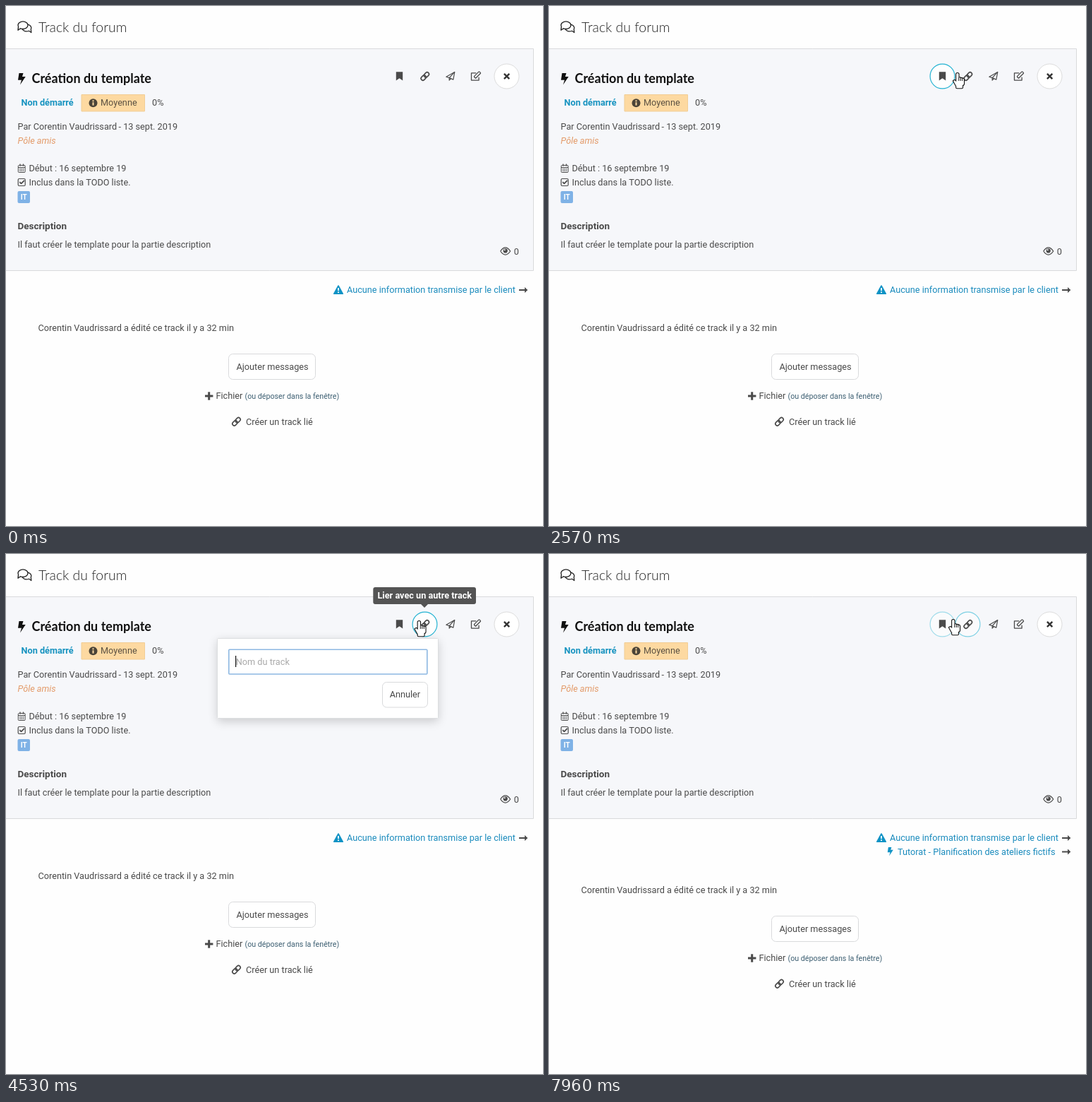
An HTML page with a canvas for the animation above (7.99 s loop, 761 by 736 pixels).

```html
<!DOCTYPE html>
<html lang="fr">
<head>
<meta charset="utf-8">
<title>Track du forum</title>
<style>
html, body { margin: 0; width: 100%; height: 100%; overflow: hidden; background: #fefefe; }
canvas { display: block; }
</style>
</head>
<body>
<canvas id="stage" width="761" height="736"></canvas>
<script>
const c = document.getElementById('stage').getContext('2d');
const LOOP = 7990;
const PAGE = '#fefefe', INK = '#4a4a4a', BLUE = '#1a8bbd', CYAN = '#25b3d2', LINE = '#d9dadc';
const FACE = 'px Roboto, Arial, sans-serif';
const BODY = '12.7' + FACE, BOLD = '700 ' + BODY;
const AUTHOR = 'Corentin Vaudrissard';
const LINKED = 'Tutorat - Planification des ateliers fictifs';
const RESULTS = [LINKED, ...['Saisie des absences', 'Export des tableaux', 'Choix des horaires',
  'Envoi des rappels', 'Partage des notes', 'Bilan de fin de mois'].map(s => 'Tutorat - ' + s)];

const OPEN = 3470, TYPE = 5010, LIST = 5860, PICK = 6420, SEND = 6920, DONE = 7130;
const BLINK = 530;
const TOOL_Y = 99.5, PITCH = 36;
const toolX = i => 557.5 + i * PITCH;
const keyTime = i => i ? TYPE + 105 + 125 * i : TYPE;

// ---- timing

const ramp = (t, a, b) => Math.max(0, Math.min(1, (t - a) / (b - a)));

function ease(t, a, b) {
  const k = ramp(t, a, b);
  return k * k * (3 - 2 * k);
}

// The pointer enters, rises to the tools, sweeps left, returns to the link tool, then leaves it.
function pointer(t) {
  const enter = ease(t, 150, 410), rise = ease(t, 1300, 1880);
  return [
    663 - 34 * enter + 17 * rise - 81 * ease(t, 2070, 2330) + 28 * ease(t, 2460, 2680)
      - 7.5 * ease(t, 2940, 3120) - 12.5 * ease(t, 7840, 7920),
    740 - 179 * enter - 466 * rise - 2 * ease(t, 7840, 7920)
  ];
}

// Share of the recent past during which the pointer was over a tool.
function hover(i, t) {
  const steps = 12;
  let inside = 0;
  for (let k = 0; k < steps; k++) {
    const [x, y] = pointer(t - 20 - k * 9);
    if (Math.abs(x - toolX(i)) < PITCH / 2 && Math.abs(y - TOOL_Y) < PITCH / 2) inside++;
  }
  return inside / steps;
}

// ---- drawing helpers

function text(s, x, y, color = INK, font = BODY) {
  c.font = font;
  c.fillStyle = color;
  c.fillText(s, x, y);
}

function paint(fill, stroke, width = 1) {
  if (fill) { c.fillStyle = fill; c.fill(); }
  if (stroke) { c.strokeStyle = stroke; c.lineWidth = width; c.stroke(); }
}

function shape(points, fill, stroke, width) {
  c.beginPath();
  points.forEach(p => c.lineTo(...p));
  c.closePath();
  paint(fill, stroke, width);
}

function line(color, width, ...points) {
  c.beginPath();
  points.forEach(p => c.lineTo(...p));
  paint(null, color, width);
}

function box(x, y, w, h, r, fill, stroke, width) {
  c.beginPath();
  c.roundRect(x, y, w, h, r);
  paint(fill, stroke, width);
}

function disc(x, y, r, fill, stroke, width) {
  c.beginPath();
  c.arc(x, y, r, 0, 7);
  paint(fill, stroke, width);
}

function rect(x, y, w, h, fill) {
  c.fillStyle = fill;
  c.fillRect(x, y, w, h);
}

function at(x, y, draw, { angle = 0, scale = 1, flip = 1, alpha = 1 } = {}) {
  c.save();
  c.translate(x, y);
  c.rotate(angle);
  c.scale(scale * flip, scale);
  c.globalAlpha = alpha;
  draw();
  c.restore();
}

// ---- icons

const chain = (x, y) => at(x, y, () => {
  for (const left of [-6.9, -.9]) box(left, -2.7, 7.8, 5.4, 2.7, null, INK, 1.6);
}, { angle: -Math.PI / 4 });

const bolt = (x, y, scale, color) => at(x, y, () => shape([[-3.5, -8], [2.5, -8], [1, -3],
  [5.7, -3], [-2, 8.5], [0, 1.7], [-5, 1.7]], color), { scale });

const bubble = (x, y, scale, flip) => at(x, y, () => {
  c.beginPath();
  c.ellipse(0, 0, 7, 5.3, 0, 2.75, 2.1 + Math.PI * 2);
  c.lineTo(-7, 7);
  c.closePath();
  paint(PAGE, '#222', 1.4);
}, { scale, flip });

const arrow = y => {
  line(INK, 2, [727, y], [736, y]);
  shape([[735, y - 4], [739.3, y], [735, y + 4]], INK);
};

const plus = (x, y, r, color, width, angle = 0) => at(x, y, () => {
  line(color, width, [-r, 0], [r, 0]);
  line(color, width, [0, -r], [0, r]);
}, { angle });

function calendar() {
  box(17.3, 225.5, 9.8, 10, 1, null, INK);
  line(INK, 1, [17, 228.5], [27, 228.5]);
  for (let i = 0; i < 3; i++) {
    rect(19.2 + i * 2.3, 230, 1.4, 1.4, INK);
    rect(19.2 + i * 2.3, 232.5, 1.4, 1.4, INK);
  }
  for (const x of [20, 24.5]) line(INK, 1.3, [x, 223.5], [x, 226.5]);
}

function checkbox() {
  box(17.2, 244.5, 10, 10, 1.5, null, INK, 1.2);
  line(INK, 1.7, [19.3, 249], [21.5, 251.4], [26, 246.8]);
}

const eye = (x, y) => at(x, y, () => {
  c.beginPath();
  c.moveTo(-7, 0);
  c.quadraticCurveTo(0, -10.2, 7, 0);
  c.quadraticCurveTo(0, 10.2, -7, 0);
  paint(null, INK, 1.3);
  disc(0, -.6, 3.1, INK);
  disc(-1, -1.8, 1, PAGE);
});

const bookmark = () => shape([[-4.7, -6.3], [4.7, -6.3], [4.7, 6], [0, 2.7], [-4.7, 6]], INK);

function plane() {
  shape([[-5.7, .7], [6.3, -6], [4.3, 4.7], [0, 2.6]], null, INK, 1.2);
  line(INK, 1.2, [6, -5.8], [-1.2, 2.2], [-1.4, 5.6], [1, 3.3]);
}

function pencil() {
  line(INK, 1.3, [.8, -4.7], [-6, -4.7], [-6, 5.6], [4.6, 5.6], [4.6, 1.2]);
  at(2.4, -2, () => box(-1.7, -5.3, 3.4, 10.4, .8, null, INK, 1.3), { angle: Math.PI / 4 });
}

function spinner(angle) {
  for (const turn of [0, Math.PI]) {
    at(513.7, 199.5, () => {
      c.beginPath();
      c.arc(0, 0, 9.4, -2.95, -.6);
      paint(null, INK, 3.6);
      shape([[12.3, -11.5], [12.3, -2.2], [3, -2.2]], INK);
    }, { angle: angle + turn });
  }
}

function arrowCursor() {
  shape([[0, 0], [0, 16], [3.7, 12.6], [6.2, 18.2], [8.6, 17.2], [6.2, 11.6], [11, 11.6]],
    '#fff', '#111', 1.1);
}

function handCursor() {
  const parts = () => {
    c.beginPath();
    for (let i = 0; i < 4; i++) {
      const top = i && 5.2 + i * .8;
      c.roundRect(-1.8 + i * 2.5, top, 3.3, 15 - top, 1.6);
    }
    c.roundRect(-1.8, 9, 10.8, 8, 2);
    c.roundRect(-1.8, 14, 8.8, 7.2, 1);
    c.moveTo(-6, 11);
    c.lineTo(-4, 10);
    c.lineTo(-1, 13);
    c.lineTo(-1, 20);
    c.closePath();
  };
  parts();
  paint(null, '#111', 2.2);
  parts();
  paint('#fff');
  for (let i = 1; i < 4; i++) line('#111', 1, [-.7 + i * 2.5, 6], [-.7 + i * 2.5, 11]);
}

// ---- page

function card() {
  box(-5, 60.5, 752.5, 314, 0, '#f6f7fa', LINE);
  bolt(22, 103, 1, '#111');
  text('Création du template', 36.5, 109, '#111', '700 18px Lato, sans-serif');
  text('Non démarré', 21.5, 141, '#1793c0', BOLD);
  box(107, 125.5, 89.5, 23.5, 0, '#fdd9a1', '#f1cd95');
  disc(123.5, 137.2, 6, '#4b4438');
  rect(122.5, 133.3, 2, 2, '#fdd9a1');
  rect(122.5, 136.3, 2, 4.4, '#fdd9a1');
  text('Moyenne', 134, 141, '#5b5142');
  text('0%', 207, 141);
  text('Par ' + AUTHOR, 16.5, 175);
  text('- 13 sept. 2019', 159.5, 175);
  text('Pôle amis', 16.5, 195, '#e39a68', 'italic ' + BODY);
  calendar();
  text('Début : 16 septembre 19', 32.5, 234);
  checkbox();
  text('Inclus dans la TODO liste.', 32.5, 254);
  box(16.5, 262, 17.5, 17, 2, '#7fb2e6');
  text('IT', 20.8, 274, '#fff', '700 10' + FACE);
  text('Description', 16.5, 316, INK, '700 13.5' + FACE);
  text('Il faut créer le template pour la partie description', 16.5, 342);
  eye(707.7, 347);
  text('0', 719.7, 352);
}

function tools(t) {
  [bookmark, () => chain(.3, 0), plane, pencil].forEach((icon, i) => {
    at(toolX(i), TOOL_Y, () => disc(0, 0, 17.4, PAGE, CYAN, 1.2), { alpha: hover(i, t) });
    at(toolX(i), TOOL_Y, icon);
  });
  disc(709.5, TOOL_Y, 17.5, '#fff', '#dcdcdc');
  plus(709.6, TOOL_Y, 5.2, '#333', 2.4, Math.PI / 4);
}

function footer(t) {
  shape([[471, 396], [477.3, 407.3], [464.7, 407.3]], '#1193c5', '#1193c5', 1.6);
  rect(470.1, 399, 1.8, 4, '#fff');
  rect(470.1, 404.3, 1.8, 1.8, '#fff');
  text('Aucune information transmise par le client', 483, 406, BLUE);
  arrow(402);
  const done = t >= DONE;
  if (done) {
    bolt(483.5, 421, .75, '#1193c5');
    text(LINKED, 494, 425.5, BLUE);
    arrow(421.5);
  }
  at(0, done ? 20 : 0, () => {
    text(AUTHOR, 45.5, 459.5);
    text('a édité ce track il y a 32 min', 167, 459.5);
    box(315.5, 492.5, 123, 36, 6, '#fff', LINE);
    text('Ajouter messages', 326.5, 514.5);
    plus(287.7, 552, 5.7, INK, 3);
    text('Fichier', 297.5, 556);
    text('(ou déposer dans la fenêtre)', 338.5, 556, '#3d5f72', '10.7' + FACE);
    chain(326.5, 588.3);
    text('Créer un track lié', 340, 592.5);
  });
}

function results(t) {
  box(315.5, 171.5, 265, 258, 0, '#fff', '#c8c8c8');
  RESULTS.forEach((s, i) => {
    const y = 172 + i * 36, picked = !i && t >= PICK;
    if (picked) rect(316, y, 264, 38, '#1793c0');
    text(s, 332, y + 24, picked ? '#fff' : INK);
  });
}

function squiggle(x, y, w) {
  c.beginPath();
  for (let i = 0; i <= w; i += 2) c.lineTo(x + i, y + (i % 4 ? -1 : 1));
  paint(null, '#e33', 1);
}

function field(t) {
  const word = 'Tuto';
  const keys = [...word].map((_, i) => keyTime(i)).filter(k => t >= k);
  const typed = word.slice(0, keys.length);
  if (typed) text(typed, 325.8, 157, '#444');
  else text('Nom du track', 325.8, 157, '#a9a9a9');
  const width = c.measureText(typed).width;
  if (t >= PICK) squiggle(326, 158.7, width);
  const since = t - (keys.pop() ?? OPEN);
  if (Math.floor(since / BLINK) % 2 === 0) rect(Math.round(325.4 + width), 144, 1.2, 16, '#111');
}

function popup(t) {
  c.save();
  c.shadowColor = 'rgba(0,0,0,.18)';
  c.shadowBlur = 14;
  c.shadowOffsetY = 4;
  box(299.5, 119, 313, 114, 1, '#fff');
  c.restore();
  box(299.5, 119.5, 313, 113, 1, null, '#dcdee0');
  box(315.8, 135.2, 281, 34.8, 1, '#fff', '#8db8e2', 1.6);
  box(533.5, 181.5, 64, 35.5, 6, '#fff', LINE);
  text('Annuler', 543.7, 203);
  field(t);
  if (t >= LIST && t < SEND) results(t);
  if (t >= SEND) spinner((t - SEND) / 2000 * Math.PI * 2);
}

function tooltip(t) {
  const alpha = Math.min(ramp(t, 3235, 3635), 1 - ramp(t, DONE, DONE + 90));
  if (!alpha) return;
  at(0, 0, () => {
    box(520.3, 47, 145.7, 24, 3, '#545454');
    shape([[588, 71], [598, 71], [593, 76]], '#545454');
  }, { alpha });
  text('Lier avec un autre track', 526.5, 63, '#fff', BOLD);
}

function draw(t) {
  rect(0, 0, 761, 736, PAGE);
  c.lineJoin = 'round';
  bubble(29.3, 31, .93, -1);
  bubble(24, 27.2, 1, 1);
  text('Track du forum', 46, 36.5, '#222', '300 19.4px Lato, sans-serif');
  card();
  tools(t);
  footer(t);
  if (t >= OPEN && t < DONE) popup(t);
  tooltip(t);
  const [x, y] = pointer(t);
  at(x, y, y < TOOL_Y + PITCH / 2 ? handCursor : arrowCursor);
}

let start;
function tick(now) {
  start ??= now;
  draw((now - start) % LOOP);
  requestAnimationFrame(tick);
}
draw(0);
requestAnimationFrame(tick);
</script>
</body>
</html>
```
